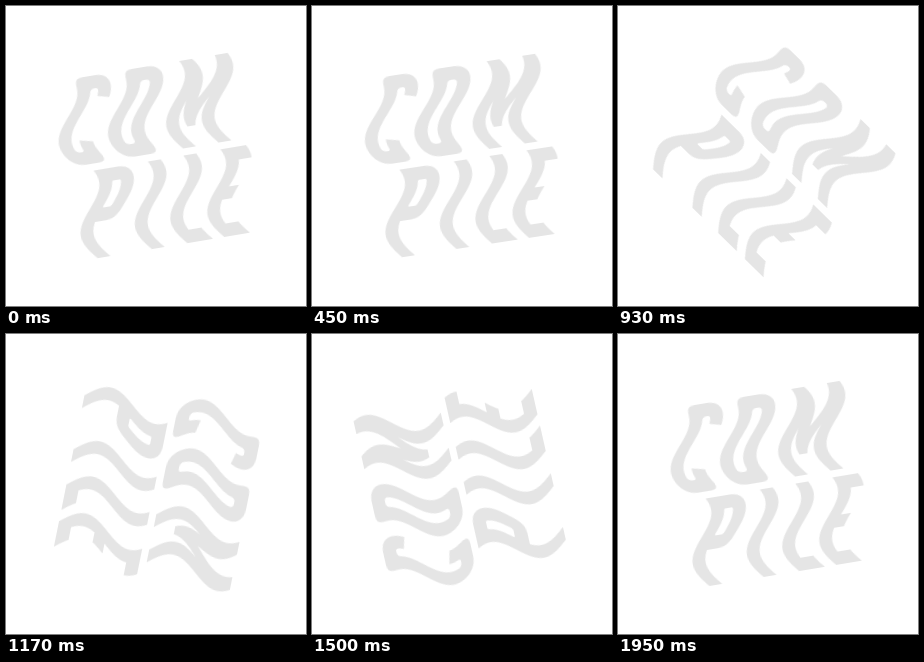
Write an HTML page that moves like this. It is 300x300 px and loops after 1.98 s.

```html
<!DOCTYPE html>
<html lang="en">
<head>
<meta charset="utf-8">
<title>Compile</title>
<style>
  html, body { margin: 0; width: 100%; height: 100%; overflow: hidden; background: #fff; }
  svg { display: block; width: 100vw; height: 100vh; }
  #word {
    fill: #e5e5e5;
    fill-rule: evenodd;
    transform-origin: .7px 2.2px;
    animation: spin 1980ms infinite;
  }
  /* wind up, accelerate through a full turn, overshoot, settle */
  @keyframes spin {
    0% { transform: rotate(-9.5deg); animation-timing-function: cubic-bezier(.3, 0, .6, 1); }
    6.06% { transform: rotate(-17deg); animation-timing-function: cubic-bezier(.895, 0, .95, 1); }
    82.4% { transform: rotate(359deg); animation-timing-function: cubic-bezier(.3, 0, .3, 1); }
    100% { transform: rotate(350.5deg); }
  }
</style>
</head>
<body>
<svg viewBox="-150 -150 300 300" role="img" aria-label="COMPILE"><path id="word"/></svg>
<script>
  const H = 87;   // letter height
  const S = 13;   // stem width
  const B = 13;   // bar height

  const box = (x, y, w, h, r) => [[x, y, r], [x + w, y, r], [x + w, y + h, r], [x, y + h, r]];

  // Each glyph is a list of contours; a corner is [x, y, radius].
  const glyphs = {
    C: [[[0, 0, 11], [34, 0, 10], [34, 24], [21, 21], [21, B, 3], [S, B, 4], [S, H - B, 4],
         [21, H - B, 3], [21, 62], [34, 65], [34, H, 10], [0, H, 11]]],
    O: [box(0, 0, 37, H, 11), box(S + .5, B, 10, H - 2 * B, 4)],
    M: [[[0, 0], [13, 0], [24.5, 40], [36, 0], [49, 0], [49, H], [36, H], [36, 40],
         [28.5, 66], [20.5, 66], [13, 40], [13, H], [0, H]]],
    P: [[[0, 0], [35, 0, 10], [35, 51, 11], [S, 51], [S, H], [0, H]],
        box(S, B, 9, 25, 2)],
    I: [box(0, 0, S, H)],
    L: [[[0, 0], [S, 0], [S, H - B], [26, H - B], [26, H], [0, H]]],
    E: [[[0, 0], [26, 0], [26, B], [S, B], [S, 38], [23, 38], [23, 50], [S, 50],
         [S, H - B], [26, H - B], [26, H], [0, H]]]
  };

  const rows = [
    { y: -90, letters: { C: -67, O: -17, M: 42 } },
    { y: 4, letters: { P: -60.5, I: -5.5, L: 30.5, E: 68 } }
  ];

  const wave = h => 13.5 * (Math.cos(2 * Math.PI * (h - 12) / 101) - 1) + 0.5;

  const mix = (a, b, t) => [a[0] + (b[0] - a[0]) * t, a[1] + (b[1] - a[1]) * t];
  const dist = (a, b) => Math.hypot(b[0] - a[0], b[1] - a[1]);

  function roundCorners(pts) {
    return pts.flatMap((p, i) => {
      const r = p[2];
      if (!r) return [p];
      const prev = pts.at(i - 1), next = pts[(i + 1) % pts.length];
      const a = mix(p, prev, r / dist(p, prev));
      const b = mix(p, next, r / dist(p, next));
      return [0, .2, .4, .6, .8, 1].map(t => mix(mix(a, p, t), mix(p, b, t), t));
    });
  }

  function subdivide(pts) {
    return pts.flatMap((p, i) => {
      const next = pts[(i + 1) % pts.length];
      const n = Math.max(1, Math.ceil(dist(p, next) / 2.5));
      return Array.from({ length: n }, (_, k) => mix(p, next, k / n));
    });
  }

  const contourPath = (pts, x0, y0) =>
    'M' + subdivide(roundCorners(pts))
      .map(([x, y]) => (x0 + x + wave(y)).toFixed(2) + ' ' + (y0 + y).toFixed(2))
      .join('L') + 'Z';

  const path = rows.flatMap(({ y, letters }) =>
    Object.entries(letters).flatMap(([ch, x]) => glyphs[ch].map(c => contourPath(c, x, y))));

  document.getElementById('word').setAttribute('d', path.join(''));
</script>
</body>
</html>
```
